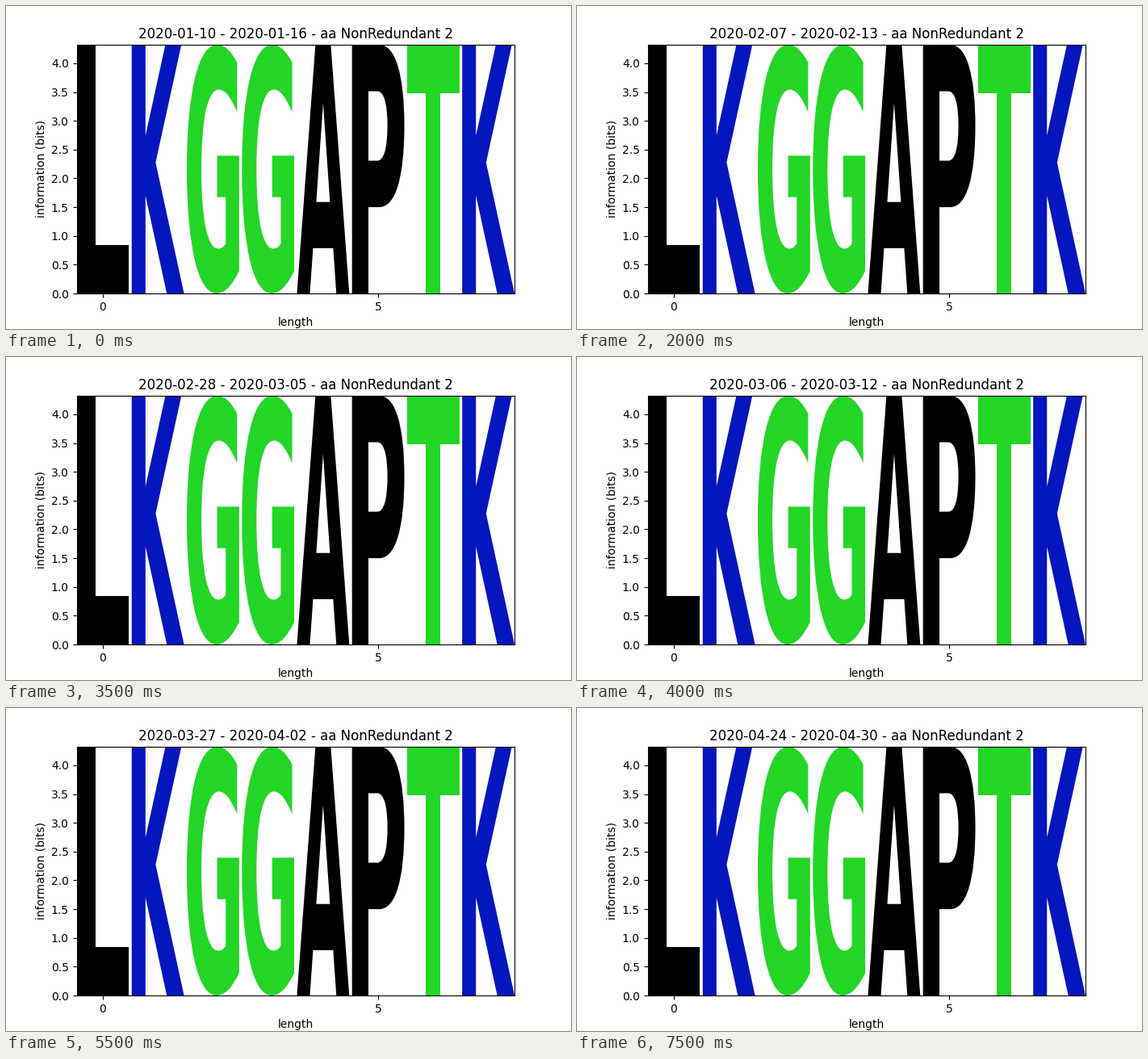
Animation, 700 px wide and 400 px high, one loop 8000 ms. Source, as a matplotlib script:

```python
import numpy as np
import matplotlib.pyplot as plt
from matplotlib.animation import FuncAnimation
from matplotlib.patches import PathPatch
from matplotlib.textpath import TextPath
from matplotlib.transforms import Affine2D

SEQUENCE = "LKGGAPTK"
BITS = np.log2(20)
WIDTH = 0.95
WEEKS = 16
START = np.datetime64("2020-01-10")

BLACK, BLUE, GREEN = "#000000", "#0416bd", "#23d626"
COLORS = {"L": BLACK, "A": BLACK, "P": BLACK,
          "K": BLUE, "G": GREEN, "T": GREEN}
FONT = {"family": "DejaVu Sans", "weight": "bold"}

plt.rcParams["font.family"] = "DejaVu Sans"


def glyph(char):
    return TextPath((0, 0), char, size=1, prop=FONT)


def add_letter(ax, char, x, height):
    """Fit a letter into the cell centred on x, never wider than an E would be."""
    path = glyph(char)
    box = path.get_extents()
    sx = WIDTH / max(box.width, glyph("E").get_extents().width)
    sy = height / box.height
    fit = (Affine2D()
           .translate(-(box.x0 + box.x1) / 2, -box.y0)
           .scale(sx, sy)
           .translate(x, 0))
    ax.add_patch(PathPatch(fit.transform_path(path), zorder=0,
                           facecolor=COLORS[char], linewidth=0))


fig, ax = plt.subplots(figsize=(7, 4), dpi=100)
for i, char in enumerate(SEQUENCE):
    add_letter(ax, char, i, BITS)

ax.set_xlim(-WIDTH / 2, len(SEQUENCE) - 1 + WIDTH / 2)
ax.set_ylim(0, BITS)
ax.set_xticks([0, 5])
ax.set_yticks(np.arange(0, 4.1, 0.5))
ax.set_xlabel("length")
ax.set_ylabel("information (bits)")
title = ax.set_title("")


def update(week):
    first = START + 7 * week
    title.set_text(f"{first} - {first + 6} - aa NonRedundant 2")
    return [title]


anim = FuncAnimation(fig, update, frames=WEEKS, interval=500,
                     repeat=True, repeat_delay=0)
plt.show()
```
